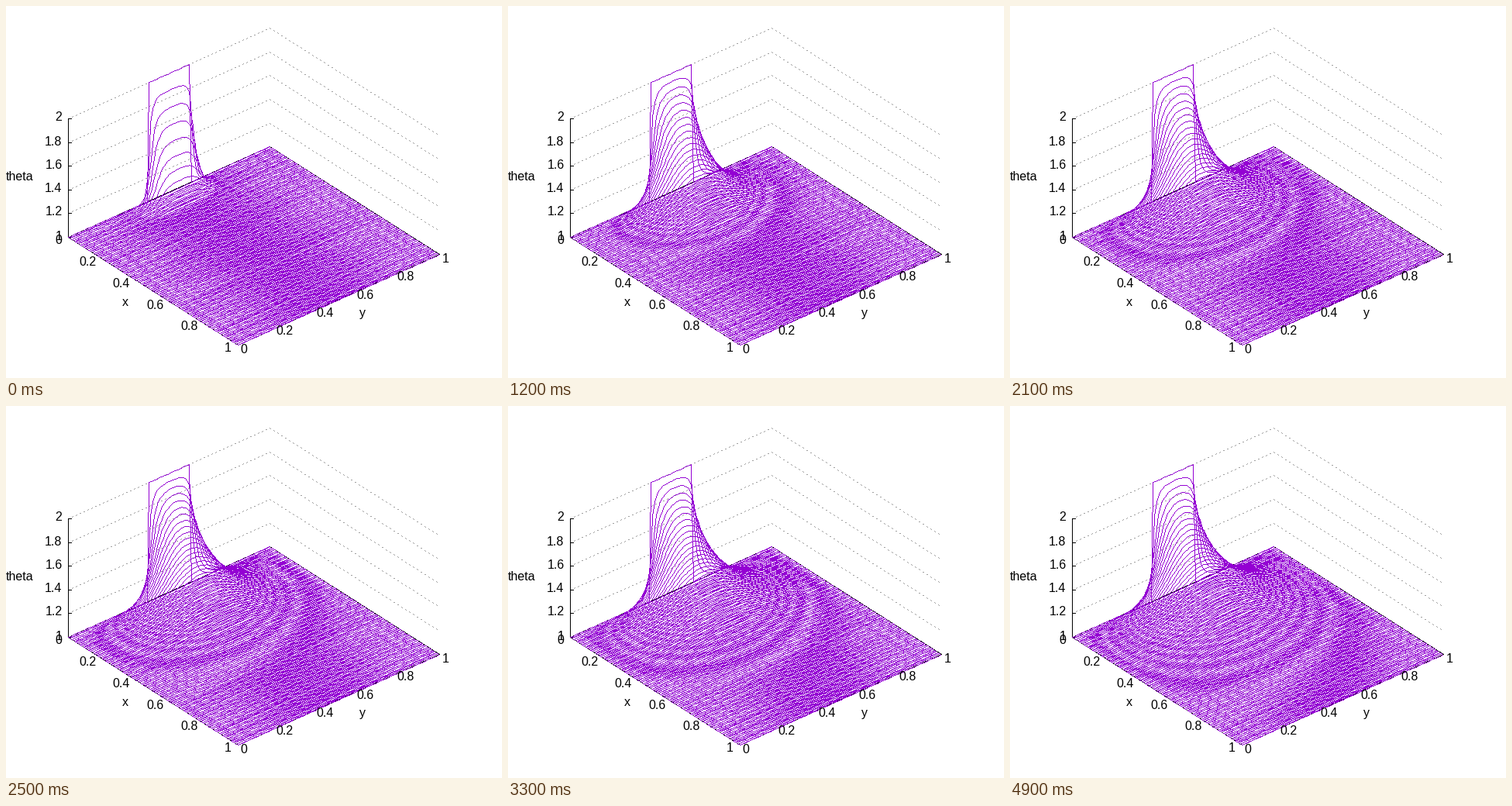
Recreate the animation shown at these times as a matplotlib script. Size 640 by 480 pixels, loop 5000 ms.

```python
import numpy as np
import matplotlib.pyplot as plt
from matplotlib.animation import FuncAnimation

WIDTH, HEIGHT, DPI = 640, 480, 100
FRAMES, INTERVAL = 50, 100
N = 101                       # grid nodes per side
STEPS, RATIO = 85, 0.1        # solver steps per frame, dt / dx^2
BLACK, GREY, VIOLET = (0, 0, 0), (160, 160, 160), (148, 0, 211)

plt.rcParams["font.family"] = "Liberation Sans"
plt.rcParams["font.size"] = 16 * 72 / DPI


def project(x, y, z=1.0):
    """Unit-square position and height to stage pixels."""
    return (80 + 218.55 * x + 260.46 * y,
            298 + 139.2 * x - 116.8 * y - 153 * (z - 1))


def to_pixels(x, y, z=1.0):
    points = np.stack(np.broadcast_arrays(*project(x, y, z)), axis=-1)
    return np.floor(points + 0.5).astype(int)


def draw_polyline(canvas, points, color, on=1, period=1):
    """Hard-edged line one pixel wide, optionally dashed."""
    points = np.asarray(points)
    delta = np.diff(points, axis=0)
    counts = np.maximum(np.abs(delta).max(axis=1), 1)
    segment = np.repeat(np.arange(len(delta)), counts)
    step = np.arange(counts.sum())
    part = (step - (np.cumsum(counts) - counts)[segment]) / counts[segment]
    pixels = points[segment] + np.floor(part[:, None] * delta[segment] + 0.5)
    xs, ys = pixels[step % period < on].astype(int).T
    canvas[ys, xs] = color


def solve():
    """Heat spreading from a hot strip, conductivity proportional to theta."""
    theta = np.ones((N, N))
    theta[0, 40:61] = 2
    fields = []
    for _ in range(FRAMES):
        for _ in range(STEPS):
            q = theta * theta / 2
            theta[1:-1, 1:-1] += RATIO * (
                q[2:, 1:-1] + q[:-2, 1:-1] + q[1:-1, 2:] + q[1:-1, :-2]
                - 4 * q[1:-1, 1:-1])
        fields.append(theta.copy())
    return fields


fields = solve()
grid = np.linspace(0, 1, N)
rows, cols = np.meshgrid(grid, grid, indexing="ij")

fig = plt.figure(figsize=(WIDTH / DPI, HEIGHT / DPI), dpi=DPI, facecolor="white")
ax = fig.add_axes([0, 0, 1, 1])
ax.axis("off")


def label(x, y, text, align="center"):
    ax.text(x, y, text, ha=align, va="baseline")


backdrop = np.full((HEIGHT, WIDTH, 3), 255, np.uint8)

# Dotted height lines on the two back walls
for z in (1.2, 1.4, 1.6, 1.8, 2.0):
    walls = [to_pixels(x, y, z) for x, y in ((0, 0), (0, 1), (1, 1))]
    draw_polyline(backdrop, walls, GREY, 2, 5)

# Base outline and height axis
outline = [to_pixels(x, y) for x, y in ((0, 0), (1, 0), (1, 1), (0, 1), (0, 0))]
draw_polyline(backdrop, outline, BLACK)
draw_polyline(backdrop, [to_pixels(0, 0, 1), to_pixels(0, 0, 2)], BLACK)

for value in (0, 0.2, 0.4, 0.6, 0.8, 1):
    text = f"{value:g}"
    x, y = to_pixels(0, 0, 1 + value)
    draw_polyline(backdrop, [(x, y), (x + 5, y)], BLACK)
    label(72.5, y + 3.5, f"{1 + value:g}", "right")
    x, y = project(value, 0)
    label(x - 7.5, y + 9, text, "right")
    x, y = project(1, value)
    label(x + 8.5, y + 10.5, text)

label(0, 225, "theta", "left")
label(154, 387, "x")
label(460, 401, "y")

picture = ax.imshow(backdrop, extent=(0, WIDTH, HEIGHT, 0), aspect="auto",
                    interpolation="nearest")


def update(frame):
    canvas = backdrop.copy()
    # One unbroken pen stroke: after each row it runs back along the floor
    points = to_pixels(rows, cols, fields[frame])
    draw_polyline(canvas, points.reshape(-1, 2), VIOLET)
    picture.set_data(canvas)
    return picture,


animation = FuncAnimation(fig, update, frames=FRAMES, interval=INTERVAL,
                          repeat=True, repeat_delay=0)
plt.show()
```
